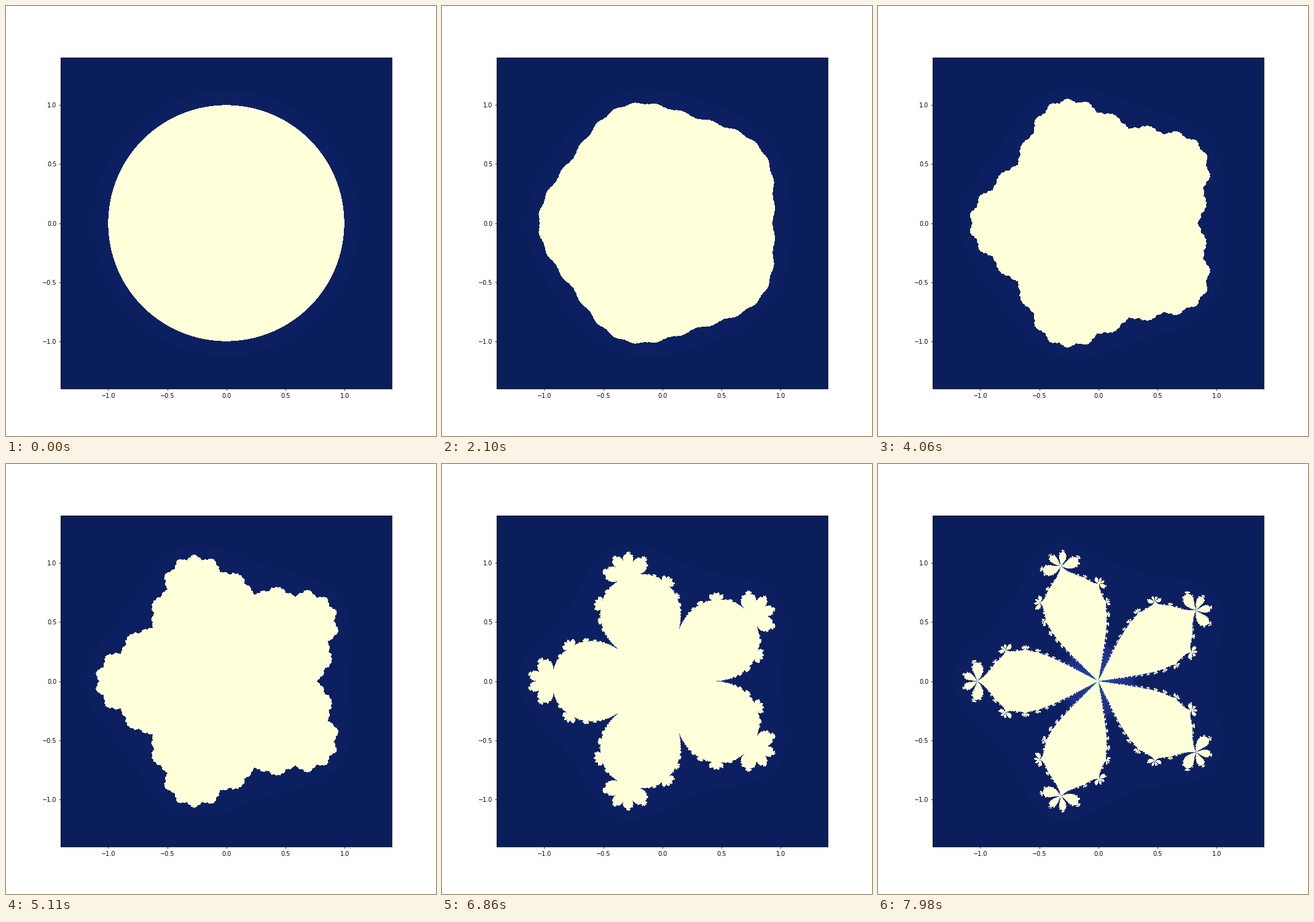
Animation of 700x700 px, one loop 8 s. Source, as a matplotlib script:

```python
import numpy as np
import matplotlib.pyplot as plt
from matplotlib.animation import FuncAnimation

FRAMES = 115
LOOP_MS = 8000
SIZE = 539
SPAN = 1.4
MAX_ITER = 100
ESCAPE = 2.0 ** 5

# The map z -> z^6 + c z becomes w -> w (w + c)^5 for w = z^5.
# Only the upper half plane is computed; the lower half mirrors it.
x = np.linspace(-SPAN, SPAN, SIZE)
half = SIZE // 2
START = ((x[None, :] + 1j * x[half:, None]) ** 5).ravel()

# Neighbouring slow levels share one flat shade.
SHADE = np.arange(MAX_ITER + 1)
SHADE[3:8] = 2
SHADE[8] = 4


def trapped(w, c):
    """Points certain to stay bounded, near an attracting fixed point."""
    if c < 1:
        return np.abs(w) < 1 - c
    return np.abs(w + c - 1) < 0.5 * (c - 1)


def escape_counts(c):
    counts = np.full(START.size, MAX_ITER)
    index = np.arange(START.size)
    w = START
    for k in range(1, MAX_ITER):
        t = w + c
        t2 = t * t
        w = w * (t2 * t2 * t)
        out = np.abs(w) > ESCAPE
        counts[index[out]] = k
        keep = ~(out | trapped(w, c))
        w, index = w[keep], index[keep]
        if not index.size:
            break
    upper = counts.reshape(SIZE - half, SIZE)
    return np.vstack([upper[:0:-1], upper])


def picture(i):
    return SHADE[escape_counts(0.01 * i)]


fig, ax = plt.subplots(figsize=(10, 10), dpi=70)
image = ax.imshow(picture(0), cmap="YlGnBu_r", vmin=0, vmax=MAX_ITER,
                  extent=(-SPAN, SPAN, -SPAN, SPAN), origin="lower",
                  interpolation="nearest")
ticks = np.arange(-1, 1.1, 0.5)
ax.set_xticks(ticks)
ax.set_yticks(ticks)


def update(i):
    image.set_data(picture(i))
    return (image,)


anim = FuncAnimation(fig, update, frames=FRAMES, interval=LOOP_MS / FRAMES,
                     init_func=lambda: update(0), repeat=True, repeat_delay=0)
plt.show()
```
